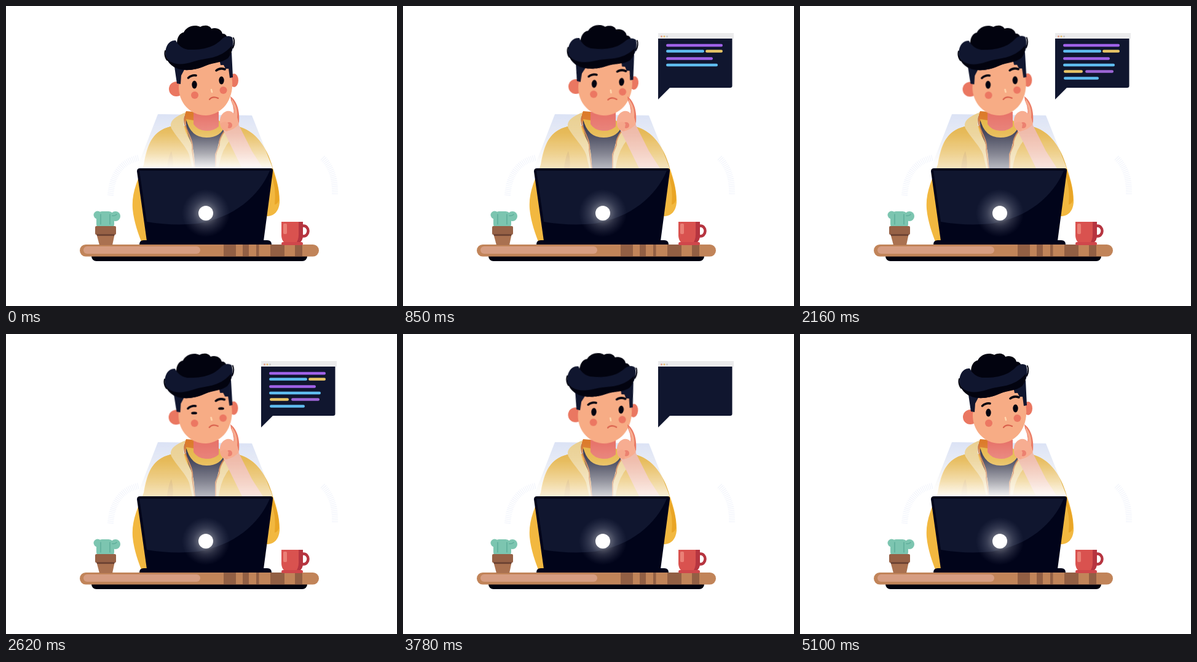
An HTML page that plays this animation: 636x488 px, repeating every 5170 ms.

```html
<!DOCTYPE html>
<html lang="en">
<head>
<meta charset="utf-8">
<title>Thinking at the laptop</title>
<style>
  html, body { margin: 0; width: 100%; height: 100%; overflow: hidden; background: #fff; }
  svg { display: block; width: 100%; height: 100%; }
  .ink { fill: #02030f; }
  .screen { fill: #01041a; }
  .navy { fill: #10162f; }
  .skin { fill: #f7ac85; }
  .blush { fill: #ec7762; }
  .gold { fill: #f2b840; }
  .line { fill: none; stroke-linecap: round; stroke-linejoin: round; }

  .head, .brows, .eye, .bubble, .light { animation: 5170ms linear infinite; }
  .head { transform-origin: 325px 180px; animation-name: sway; animation-timing-function: ease-in-out; }
  .eye { transform-box: fill-box; transform-origin: 50% 55%; animation-name: blink; }
  .brows { animation-name: frown; }
  .bubble { transform-origin: 415px 152px; animation-name: pop; }
  .light { animation-name: dim; }
  .code rect { transform-box: fill-box; transform-origin: 0 50%; transform: scaleX(0); }

  @keyframes sway {
    0%, 4.45% { transform: rotate(0); }
    16.44% { transform: rotate(5deg); }
    42.55%, 48.36% { transform: rotate(-.6deg); }
    80.56% { transform: rotate(4.9deg); }
    98.65%, 100% { transform: rotate(0); }
  }
  @keyframes blink {
    0%, 48.6%, 53.8%, 85.9%, 91%, 100% { transform: none; }
    50.1%, 52.2%, 87.4%, 89.5% { transform: scale(1.15, .34); }
  }
  @keyframes frown {
    0%, 48.6%, 53.8%, 85.9%, 91%, 100% { transform: none; }
    50.1%, 52.2%, 87.4%, 89.5% { transform: translateY(4px); }
  }
  @keyframes pop {
    0%, 4.44% { transform: scale(0); }
    7.2%, 98.6% { transform: none; }
    98.61%, 100% { transform: scale(0); }
  }
  @keyframes dim {
    0%, 4.45%, 98.65%, 100% { opacity: 1; }
    16.44%, 52% { opacity: .7; }
    72%, 90% { opacity: .84; }
  }
</style>
</head>
<body>
<svg viewBox="0 0 636 488">
  <defs>
    <linearGradient id="haze" x1="0" y1="0" x2="0" y2="1">
      <stop offset="0" stop-color="#dce3f5"/>
      <stop offset=".55" stop-color="#e6ebf8"/>
      <stop offset="1" stop-color="#fff"/>
    </linearGradient>
    <linearGradient id="beam" x1="0" y1="0" x2="0" y2="1">
      <stop offset="0" stop-color="#fff" stop-opacity="0"/>
      <stop offset=".35" stop-color="#fffaf0" stop-opacity=".2"/>
      <stop offset=".72" stop-color="#fffdf8" stop-opacity=".6"/>
      <stop offset="1" stop-color="#fff" stop-opacity=".95"/>
    </linearGradient>
    <radialGradient id="glow">
      <stop offset=".25" stop-color="#fff" stop-opacity=".38"/>
      <stop offset=".55" stop-color="#c8cbdc" stop-opacity=".2"/>
      <stop offset="1" stop-color="#8a90b0" stop-opacity="0"/>
    </radialGradient>
  </defs>

  <!-- faint backdrop -->
  <g fill="none" stroke="#f0f3fb" stroke-width="10" stroke-dasharray="1 2">
    <path d="M170 308Q174 256 216 247"/>
    <path d="M515 247Q536 268 535 306"/>
  </g>
  <path d="M247 176L400 178 434 264H213Z" fill="url(#haze)"/>

  <!-- body -->
  <path class="gold" d="M272 195C238 202 230 224 224 258C214 284 204 304 206 330C208 352 216 372 220 383H400V342H426Q443 340 445 320C446 298 437 268 426 244C414 214 398 202 378 196Z"/>
  <path d="M432 264C440 282 445 300 444 316Q442 322 437 323Q440 296 431 272Z" fill="#e9a526"/>
  <path d="M272 195C238 202 230 224 224 264H306L300 230ZM352 205L342 264H434C425 228 404 203 378 196Z" fill="#e3b143"/>
  <path d="M262 264Q264 245 269 236Q273 250 271 264Z" fill="#cf9b3c"/>
  <path d="M293 171C288 180 291 191 297 201L303 212 306 200 305 172Z" fill="#dc7b2b"/>
  <path d="M293 186C300 203 350 207 357 193L352 214Q343 226 341 264H307Q307 236 300 220Q292 203 293 186Z" fill="#2b2e48"/>
  <path d="M293 184Q300 214 326 214Q350 214 356 194L346 186H305Z" fill="#e5b443"/>
  <path d="M305 172H346V196Q337 204 325 203Q311 202 305 192Z" fill="#e7746b"/>
  <path d="M292 173C272 181 265 189 269 199C280 217 292 227 298 242L303 264H306Q308 237 300 220Q283 194 292 173Z" fill="#ead092"/>
  <path d="M356 202Q341 222 341 264H346Q349 236 366 216Z" fill="#ead092"/>
  <path class="line" d="M291 180C286 196 306 215 303 234L307 264M355 204Q346 217 347 226L341 241V264" stroke="#ca743e" stroke-width="2"/>
  <path d="M351 197L378 192 400 236 418 264H384Z" fill="#edb3a2"/>
  <path class="light" d="M247 176L400 178 434 264H213Z" fill="url(#beam)"/>

  <!-- head -->
  <g class="head">
    <circle cx="277" cy="135" r="12" fill="#ea7761"/>
    <ellipse cx="371" cy="121" rx="7" ry="11" fill="#ea7761"/>
    <path class="skin" d="M286 100L281 130C280 158 301 179 326 178C352 176 370 153 368 122L363 80Z"/>
    <path class="navy" d="M273 92L278 126 284 127 285 113 292 100ZM347 86L349 96 354 96 357 102 362 102 364 117 369 116 367 75Z"/>
    <path class="ink" d="M278 62C278 50 283 44 289 43C293 34 306 29 316 34C323 30 332 32 334 37C343 34 351 39 352 45Q361 45 360 57L350 72 300 84Z"/>
    <path class="navy" d="M260 83C257 67 265 55 276 56C279 62 285 69 296 71C325 72 341 65 352 53Q361 46 368 51Q373 66 364 80C355 92 341 90 325 97C302 107 271 110 260 83Z"/>
    <path class="ink" d="M260 83C269 97 286 96 303 91C327 83 346 88 367 65Q368 77 361 85C350 93 340 91 325 97C302 107 271 110 260 83Z"/>
    <path class="line" d="M259 73Q257 81 262 88M370 52Q373 60 369 68" stroke="#02030f" stroke-width="2"/>
    <path class="brows line" d="M296.500 117Q302 112 309 113M342 105Q348 100 356 103" stroke="#02030f" stroke-width="3.500"/>
    <ellipse class="eye ink" cx="306.5" cy="128" rx="4.2" ry="6.5"/>
    <ellipse class="eye ink" cx="350.5" cy="121" rx="4.2" ry="6.5"/>
    <circle class="blush" cx="307" cy="145" r="6"/>
    <circle class="blush" cx="353.5" cy="137" r="6"/>
    <path class="line" d="M334 136L335 140" stroke="#ffd9b0" stroke-width="2.5"/>
    <path class="line" d="M331 152Q336 146 345 150" stroke="#d9604c" stroke-width="2.2"/>
  </g>

  <!-- hand -->
  <path d="M365 147C374 153 381 168 379 190L368 186Q374 170 366 154Z" fill="#ea7a64"/>
  <path d="M367 151C374 160 377 168 376 181L379 192Q372 200 362 203Q349 204 348 191Q347 175 359 171Q367 170 371 176Q373 166 367 156Z" fill="#f7ad91"/>
  <circle cx="363" cy="194" r="5" fill="#ec8170"/>
  <path d="M349 191Q357 185 362 192L360 204Q349 203 349 191Z" fill="#f5a78b"/>

  <!-- desk -->
  <rect class="ink" x="139" y="398" width="351" height="17" rx="8"/>
  <rect x="120" y="388" width="389" height="19.5" rx="9.7" fill="#c18459"/>
  <rect x="126" y="391" width="190" height="12" rx="6" fill="#d69d82"/>
  <path d="M354 388h20v19h-20zM385 388h10v19h-10zM407 388h4.500v19h-4.500zM430 388h23v19h-23zM470 388h12v19h-12z" fill="#925f44"/>

  <!-- laptop -->
  <path class="screen" d="M218 264H430Q435 264 434 269L419 382H229L213 269Q213 264 218 264ZM224 381H425Q432 381 432 388H217Q217 381 224 381Z"/>
  <path class="navy" d="M217 268H429C412 309 371 344 312 354Q270 358 229 351Z"/>
  <circle cx="325" cy="337" r="39" fill="url(#glow)"/>
  <circle cx="325" cy="337" r="12" fill="#fff"/>

  <!-- cactus -->
  <g fill="#7cc5b0">
    <circle cx="149" cy="340" r="6.500"/>
    <circle cx="178" cy="342" r="8"/>
    <path d="M144 341Q149 350 156 347V340ZM170 340V349H178L184 345Z"/>
    <rect x="147" y="334" width="29" height="30" rx="9"/>
  </g>
  <path class="line" d="M154 339V355M169 339V355M173 341Q177 342 180 339" stroke="#60ae9b" stroke-width="1.6"/>
  <path d="M147 370H177L173 389H152Z" fill="#aa7150"/>
  <rect x="145" y="358" width="34" height="14" rx="2" fill="#966146"/>
  <path d="M147 371H177L176 374H148Z" fill="#6f4434"/>

  <!-- mug -->
  <ellipse cx="484" cy="366" rx="7.500" ry="8.500" fill="none" stroke="#b63540" stroke-width="4.500"/>
  <path d="M448 351H483V374Q482 387 470 387H461Q449 387 448 374Z" fill="#d9524f"/>
  <path d="M476 351H483V374Q482 386 471 387Q476 381 476 372Z" fill="#b63540"/>
  <rect x="451" y="354" width="6" height="17" rx="2" fill="#ea8076"/>
  <rect x="448" y="384" width="35" height="5" rx="2.500" fill="#cf474b"/>

  <!-- speech bubble -->
  <g class="bubble">
    <path class="navy" d="M415 52H535.500V130Q535.500 133 532 133H434L415 152Z"/>
    <rect x="415" y="44" width="123" height="9" fill="#ebebec"/>
    <circle cx="420.500" cy="49.500" r="1.500" fill="#e5a088"/>
    <circle cx="425" cy="49.500" r="1.500" fill="#e8c070"/>
    <circle cx="429.500" cy="49.500" r="1.500" fill="#cacaca"/>
    <g class="code"></g>
  </g>
</svg>
<script>
  const LOOP = 5170, STEP = 95, STARTS = [376, 3785], CLEARS = [3400, 5095];
  const PURPLE = '#a062e8', BLUE = '#5fbdf0', YELLOW = '#e8c566', GREY = '#c0c4d4';
  const code = document.querySelector('.code');
  const options = { duration: LOOP, iterations: Infinity };

  // x, y, width, colour, in typing order
  const dashes = [
    [428, 64, 92, PURPLE],
    [428, 73.5, 62, BLUE],
    [492, 73.5, 28, YELLOW],
    [428, 85.5, 76, PURPLE],
    [428, 96, 84, BLUE],
    [429, 106.5, 31, YELLOW],
    [464, 106.5, 46, '#9c66d6'],
    [429, 117.5, 57, BLUE]
  ];

  const key = (time, props) => ({ offset: time / LOOP, ...props });
  const width = (time, scale) => key(time, { transform: `scaleX(${scale})` });

  dashes.forEach(([x, y, w, fill], i) => {
    const dash = document.createElementNS(code.namespaceURI, 'rect');
    const attrs = { x, y: y - 2.25, width: w, height: 4.5, rx: 2.25, fill };
    for (const name in attrs) dash.setAttribute(name, attrs[name]);
    code.append(dash);

    const typing = STARTS.flatMap((start, n) => {
      const from = start + i * STEP;
      return [width(from, 0), width(from + STEP, 1), width(CLEARS[n], 1), width(CLEARS[n], 0)];
    });
    dash.animate([width(0, 0), ...typing, width(LOOP, 0)], options);
  });

  // the last dash is typed in grey, then takes its colour
  const tint = STARTS.flatMap((start, n) => {
    const done = start + dashes.length * STEP + 60;
    return [
      key(done, { fill: GREY }), key(done, { fill: BLUE }),
      key(CLEARS[n], { fill: BLUE }), key(CLEARS[n], { fill: GREY })
    ];
  });
  code.lastChild.animate([key(0, { fill: GREY }), ...tint, key(LOOP, { fill: GREY })], options);
</script>
</body>
</html>
```
